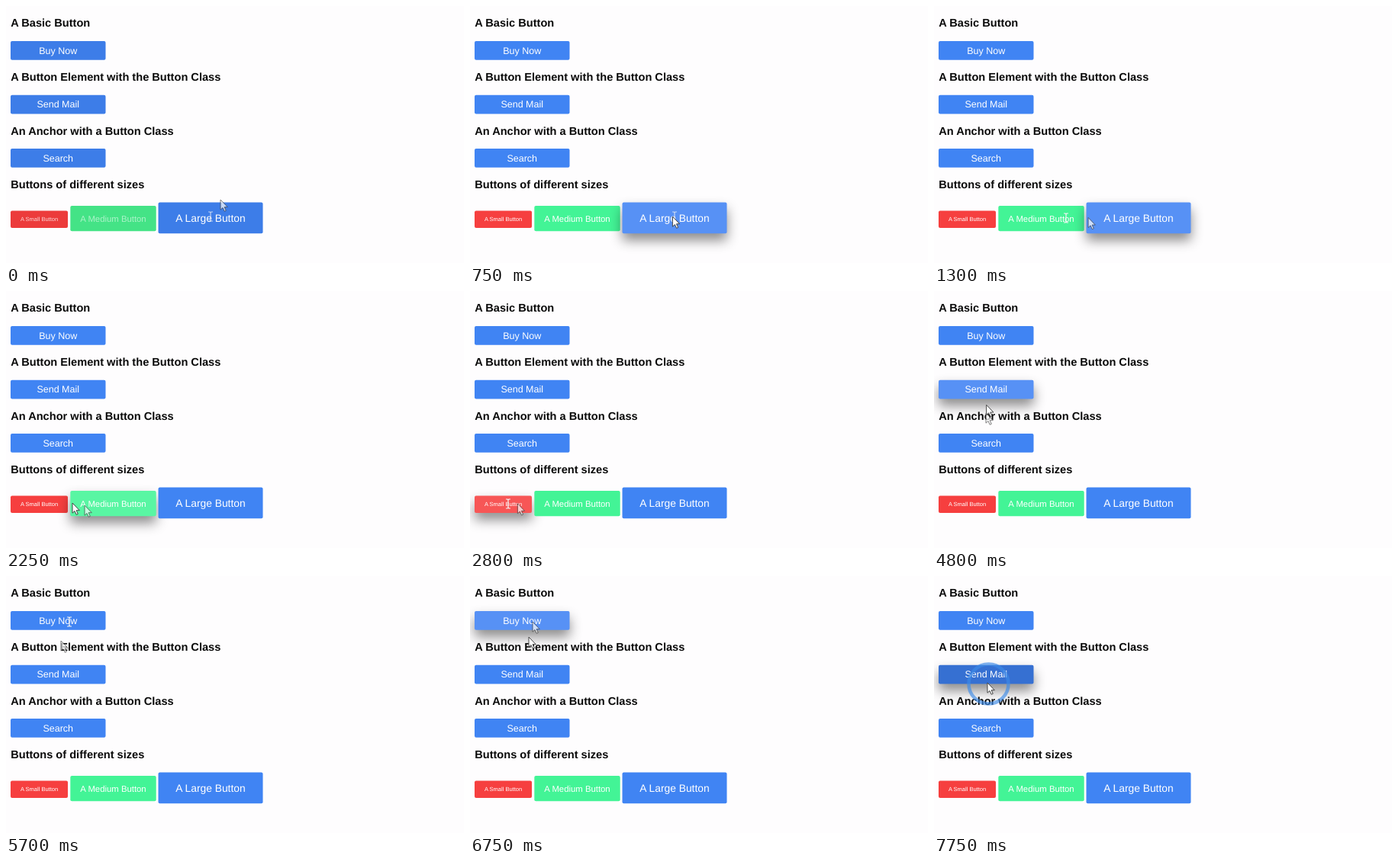
An HTML page for the animation above (8 s loop, 600 by 337 pixels).

```html
<!DOCTYPE html>
<html lang="en">
<head>
<meta charset="utf-8">
<title>Button styles</title>
<style>
html, body { margin: 0; width: 100%; height: 100%; overflow: hidden; background: #fefdfe; }
svg { display: block; width: 100%; height: 100%; font-family: "Liberation Sans", Arial, sans-serif; text-rendering: geometricPrecision; }
.head { font-weight: bold; font-size: 14.6px; fill: #0a0a0a; }
.label { fill: #fff; text-anchor: middle; }
.lit { filter: drop-shadow(0 9px 8px rgba(0, 0, 0, .45)); }
.cursor { stroke: #444; stroke-linejoin: round; fill: #fff; }
.cursor.beam { stroke: #f4f4f4; stroke-width: 1.2; fill: none; }
</style>
</head>
<body>
<svg id="stage" viewBox="0 0 600 337"></svg>
<script>
const LOOP = 8000;
const CLICK = 7600;
const stage = document.getElementById('stage');

function add(tag, attrs, text = '') {
  const el = document.createElementNS('http://www.w3.org/2000/svg', tag);
  for (const name in attrs) el.setAttribute(name, attrs[name]);
  el.textContent = text;
  return stage.appendChild(el);
}

const BLUE = { base: '#4084f3', lit: '#5791f5', pressed: '#3670d2', soft: '#3d7de8' };
const RED = { base: '#f63f3f', lit: '#f75656', soft: '#ec3b3b' };
const GREEN = { base: '#43f496', lit: '#59f6a3', soft: '#44e386' };

['A Basic Button', 'A Button Element with the Button Class',
 'An Anchor with a Button Class', 'Buttons of different sizes']
  .forEach((text, i) => add('text', { class: 'head', x: 6.2, y: 27.3 + i * 70.7 }, text));

// hovers: [start, end] pairs in ms
function button(text, x, y, width, height, size, colors, hovers, softText = 1) {
  const box = add('rect', { x, y, width, height, rx: 2 });
  const label = add('text', {
    class: 'label', x: x + width / 2, y: y + height / 2 + size * .35, 'font-size': size
  }, text);
  return { box, label, colors, hovers, softText };
}

const buttons = [
  button('Buy Now', 6, 46, 124.5, 24.7, 12.5, BLUE, [[6200, 6900]]),
  button('Send Mail', 6, 116.7, 124.5, 24.7, 12.5, BLUE, [[4750, 5400], [7250, LOOP]]),
  button('Search', 6, 187, 124.5, 24.7, 12.5, BLUE, [[4250, 4750]]),
  button('A Small Button', 6, 268.5, 75, 22.5, 7.5, RED, [[2600, 3650]], .8),
  button('A Medium Button', 84.3, 262, 112.4, 33.2, 11.35, GREEN, [[1750, 2800]], .55),
  button('A Large Button', 199.5, 257.5, 137, 40.7, 13.8, BLUE, [[250, 1750]])
];
const send = buttons[1];

const shapes = {
  arrow: 'M0 0V13.2L3 10.5L5.2 15.3L7.3 14.3L5.1 9.7H9.3Z',
  beam: 'M-3-6H-1L0-5L1-6H3M0-5V5M-3 6H-1L0 5L1 6H3',
  hand: 'M-1.5 1Q0-1 1.5 1V6Q3 4.8 4 6.4Q5.6 5.4 6.2 7Q8 6.3 8 8.5V11.5Q8 14 6.2 16.8H-1.5L-5.2 11Q-6.6 9-5.2 8.6Q-3.5 7.8-1.5 10.5Z'
};

// Mouse moves: start, end, steps, x, y, shape on arrival, easing power
const moves = [
  [0, 0, 1, 281, 254, 'arrow'],
  [250, 250, 1, 268, 276, 'beam'],
  [750, 1300, 6, 173, 278, 'beam', 2],
  [1750, 2100, 3, 103, 281, 'arrow'],
  [2250, 2250, 1, 87, 278, 'arrow'],
  [2400, 2750, 3, 50, 279, 'beam'],
  [3150, 3250, 2, 56, 283, 'arrow'],
  [3650, 3750, 2, 68, 215, 'arrow'],
  [3900, 3900, 1, 70, 203, 'hand'],
  [4250, 4600, 3, 68, 160, 'arrow'],
  [4750, 5250, 3, 70, 128, 'beam'],
  [5400, 5550, 2, 72, 85, 'arrow'],
  [5700, 5700, 1, 83, 60, 'beam'],
  [6200, 6600, 3, 82, 60, 'arrow'],
  [6750, 6750, 1, 77, 80, 'arrow'],
  [6900, 7050, 2, 72, 122, 'arrow'],
  [7250, 7250, 1, 70, 140, 'arrow']
];

const steps = [{ time: -1, x: 268, y: 276, shape: 'beam' }];
for (const [start, end, count, x, y, shape, power = 1] of moves) {
  const from = steps[steps.length - 1];
  for (let k = 1; k <= count; k++) {
    const p = (k / count) ** power;
    steps.push({
      time: start + (end - start) * (k - 1) / Math.max(1, count - 1),
      x: from.x + (x - from.x) * p,
      y: from.y + (y - from.y) * p,
      shape: k === count ? shape : 'arrow'
    });
  }
}

const ring = add('circle', { cx: 71.5, cy: 141.5, fill: 'none', stroke: '#3d8be8', 'stroke-width': 4.5, opacity: .65 });
const trail = add('path', {});
const cursor = add('path', {});

function place(el, step, opacity) {
  el.setAttribute('class', `cursor ${step.shape}`);
  el.setAttribute('d', shapes[step.shape]);
  el.setAttribute('transform', `translate(${step.x} ${step.y})`);
  el.setAttribute('opacity', opacity);
}

function draw(now) {
  const t = now % LOOP;
  const soft = t < 250;
  const pressed = t >= CLICK;

  for (const b of buttons) {
    const lit = b.hovers.some(([from, to]) => t >= from && t < to);
    const state = soft ? 'soft' : b === send && pressed ? 'pressed' : lit ? 'lit' : 'base';
    b.box.setAttribute('fill', b.colors[state]);
    b.box.setAttribute('class', lit ? 'lit' : '');
    b.label.setAttribute('opacity', soft ? b.softText : 1);
  }

  let i = steps.length - 1;
  while (steps[i].time > t) i--;
  place(cursor, steps[i], soft ? .7 : 1);
  place(trail, steps[i - 1], pressed ? 0 : .7);

  const growth = Math.min(2, Math.floor((t - CLICK) / 75));
  ring.setAttribute('r', pressed ? 10 + growth * 8 : 0);
  ring.setAttribute('visibility', pressed ? 'visible' : 'hidden');
}

function frame() {
  draw(performance.now());
  requestAnimationFrame(frame);
}
frame();
</script>
</body>
</html>
```
